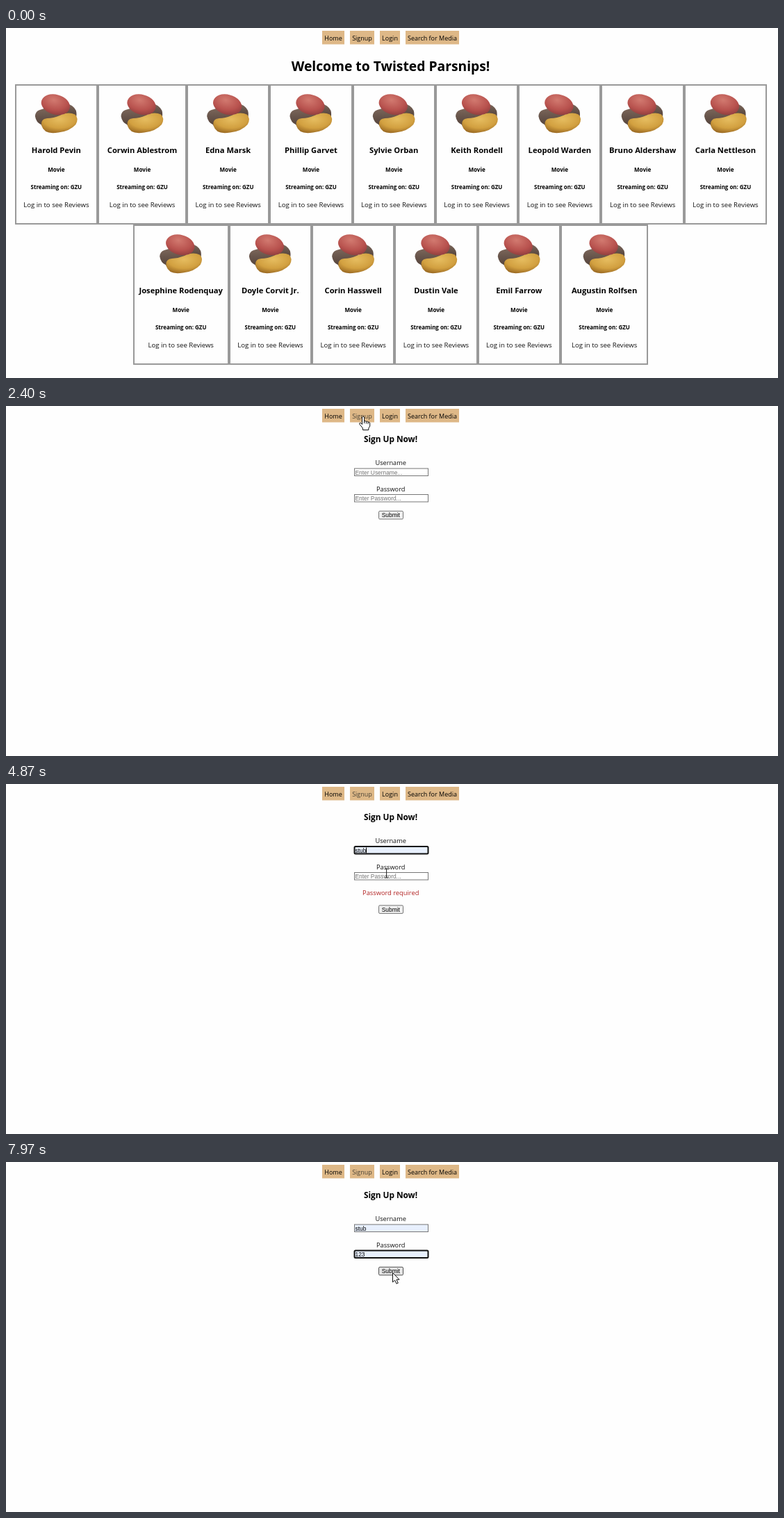
These frames come from a looping animation (1111x504 px, 8 s). An HTML page:

```html
<!DOCTYPE html>
<html lang="en">
<head>
<meta charset="utf-8">
<title>Signup walkthrough</title>
<style>
  html, body { margin: 0; width: 100%; height: 100%; overflow: hidden; background: #fefefe; }
  svg { display: block; width: 100%; height: 100%; }
  text { font-family: "Open Sans", "Noto Sans", sans-serif; fill: #000; }
  .b { font-weight: 700; }
  .mid { text-anchor: middle; }
  .nav { font-size: 9px; }
  .title { font-size: 19.3px; }
  .name { font-size: 11.2px; }
  .kind { font-size: 8.1px; }
  .stream { font-size: 7.95px; }
  .log { font-size: 9.6px; fill: #111; }
  .head { font-size: 11.8px; }
  .label { font-size: 9.2px; fill: #111; }
  .error { font-size: 9.3px; fill: #b22222; }
  .item { font-size: 10.3px; fill: #222; }
  .ui { font: 8.4px "Liberation Sans", Arial, sans-serif; }
  .hint { fill: #757575; }
</style>
</head>
<body>
<svg id="stage" viewBox="0 0 1111 504" xmlns="http://www.w3.org/2000/svg">
  <defs>
    <radialGradient id="red" cx=".4" cy=".3" r=".8">
      <stop offset="0" stop-color="#d27a70"/><stop offset=".6" stop-color="#b8524e"/><stop offset="1" stop-color="#87393a"/>
    </radialGradient>
    <radialGradient id="gold" cx=".5" cy=".3" r=".75">
      <stop offset="0" stop-color="#e6bd60"/><stop offset=".6" stop-color="#d2a040"/><stop offset="1" stop-color="#95641f"/>
    </radialGradient>
    <linearGradient id="brown" x2="0" y2="1">
      <stop offset="0" stop-color="#7c675b"/><stop offset="1" stop-color="#4c3c35"/>
    </linearGradient>
    <filter id="shadow" x="-10%" y="-10%" width="120%" height="120%">
      <feDropShadow dx="0" dy="1" stdDeviation="1.2" flood-opacity=".35"/>
    </filter>
    <g id="potatoes">
      <path d="M-30.5 127Q-30 120-24 118L-14 115 10 126-6 134-12 145Q-18 146-22 139Q-29 136-30.5 127Z" fill="url(#brown)"/>
      <path d="M14 109Q24 110 28.5 119Q30 125 28 130L8 128Z" fill="url(#brown)"/>
      <path d="M-21 141Q-23 131-13 130Q-4 130 5 126Q17 120 27 124.5Q33 130 28 139Q19 149 3 150.5Q-17 154-21 141Z" fill="url(#gold)"/>
      <ellipse cx="-1" cy="110.3" rx="21" ry="14.4" transform="rotate(15 -1 110.3)" fill="url(#red)"/>
    </g>
  </defs>
</svg>
<script>
const LOOP = 8000;
const stage = document.getElementById('stage');

function add(parent, tag, attrs = {}, content = '') {
  const node = document.createElementNS('http://www.w3.org/2000/svg', tag);
  for (const key in attrs) node.setAttribute(key, attrs[key]);
  node.textContent = content;
  parent.appendChild(node);
  return node;
}
const group = parent => add(parent, 'g');
const write = (parent, x, y, cls, content) => add(parent, 'text', { x, y, class: cls }, content);
const box = (parent, x, y, width, height, attrs) => add(parent, 'rect', { x, y, width, height, ...attrs });
const show = (node, on) => node.setAttribute('visibility', on ? 'inherit' : 'hidden');

// Navigation
const links = [['Home', 455, 32], ['Signup', 495, 35], ['Login', 538, 29], ['Search for Media', 575, 77]]
  .map(([label, x, width]) => {
    box(stage, x, 4, width, 19.5, { fill: '#deb887' });
    return write(stage, x + width / 2, 17.6, 'nav mid', label);
  });

// Home page
const home = group(stage);
write(home, 553.5, 62, 'title b mid', 'Welcome to Twisted Parsnips!');

function cardRow(left, top, names, wide) {
  let x = left;
  names.forEach((name, i) => {
    const width = wide[i] || 119.3;
    const edge = Math.round(x);
    box(home, edge + 1, top + 82, Math.round(x + width) - edge - 2, 200,
      { fill: 'none', stroke: '#999', 'stroke-width': 2 });
    const card = add(home, 'g', { transform: `translate(${x + width / 2} ${top})` });
    add(card, 'use', { href: '#potatoes' });
    write(card, 0, 180, 'name b mid', name);
    write(card, 0, 207, 'kind b mid', 'Movie');
    write(card, 0, 232, 'stream b mid', 'Streaming on: GZU');
    write(card, 0, 258.3, 'log mid', 'Log in to see Reviews');
    x += width;
  });
}
cardRow(12.7, 0, ['Harold Pevin', 'Corwin Ablestrom', 'Edna Marsk', 'Phillip Garvet', 'Sylvie Orban',
  'Keith Rondell', 'Leopold Warden', 'Bruno Aldershaw', 'Carla Nettleson'], { 1: 128 });
cardRow(182.7, 202, ['Josephine Rodenquay', 'Doyle Corvit Jr.', 'Corin Hasswell', 'Dustin Vale',
  'Emil Farrow', 'Augustin Rolfsen'], { 0: 138, 5: 126.4 });

// Signup form
const form = group(stage);
write(form, 553.5, 51.5, 'head b mid', 'Sign Up Now!');

function makeField(y, label, hint, value, caretX) {
  write(form, 553.7, y - 4.5, 'label mid', label);
  const frame = box(form, 501.5, y + .5, 106, 10.5, {});
  const hintText = write(form, 502.5, y + 9.2, 'ui hint', hint);
  const valueText = write(form, 502.5, y + 9.2, 'ui', value);
  const caret = box(form, caretX, y + 2, 1, 8, {});
  return (filled, focused, caretOn) => {
    frame.setAttribute('fill', filled ? '#e8f0fe' : '#fff');
    frame.setAttribute('stroke', focused ? '#101010' : '#767676');
    frame.setAttribute('stroke-width', focused ? 2 : 1);
    frame.setAttribute('rx', focused ? 1.5 : 0);
    show(hintText, !filled);
    show(valueText, filled);
    show(caret, caretOn);
  };
}
const setUser = makeField(89.5, 'Username', 'Enter Username...', 'stub', 518);
const setPass = makeField(127, 'Password', 'Enter Password...', '123', 516.5);
const error = write(form, 553.7, 160, 'error mid', 'Password required');
const submit = group(form);
const submitFace = box(submit, 536.5, 151.3, 35, 11.6, { rx: 1.5 });
write(submit, 553.8, 160, 'ui mid', 'Submit');

function makeMenu(top, items) {
  const node = group(form);
  box(node, 536, top, 131.3, items.length * 30.3 + 6.6, { rx: 6, fill: '#fff', filter: 'url(#shadow)' });
  const hover = group(node);
  const mid = top + 18.2;
  box(hover, 539.5, mid - 15, 124.5, 30, { fill: '#f1f1f1' });
  add(hover, 'path', { d: `M645.3 ${mid - 3.6}l7.2 7.2m0-7.2l-7.2 7.2`, stroke: '#3c4043', 'stroke-width': 1.5 });
  items.forEach((item, i) => write(node, 546.3, mid + 3.8 + i * 30.3, 'item', item));
  return { node, hover };
}
const userMenu = makeMenu(109.7, ['stub', 'Ferdinandus', 'Oscar', 'STUB', 'Hugh', 'Edgar']);
const passMenu = makeMenu(147.9, ['123', 'abc', 'ilovefarts']);

// Pointer
const pointer = group(stage);
const halo = add(pointer, 'circle', { r: 9.8, fill: '#f0e000', opacity: .7 });
const ink = { fill: '#fff', stroke: '#111', 'stroke-width': 1, 'stroke-linejoin': 'round' };
const shapes = {
  arrow: add(pointer, 'path', { ...ink, d: 'M.5 .5V14L3.7 11.2 6 16.3 8.3 15.2 6 10.3H10Z' }),
  hand: add(pointer, 'path', { ...ink,
    d: 'M-1.5 1Q0-1 1.5 1V7Q3 5.8 4.3 7.5Q5.8 6.4 7 8.2Q9.5 7.5 9.7 10V14L7.8 17V19.5H-.5V17L-5.3 11Q-5.5 9-3.5 9.3L-1.5 11.5ZM1.5 7V10M4.3 7.5V10.5M7 8.2V11' }),
  beam: add(pointer, 'path', { d: 'M-2.5-6.5H-.8L0-6 .8-6.5H2.5M0-6V6M-2.5 6.5H-.8L0 6 .8 6.5H2.5',
    fill: 'none', stroke: '#222' })
};

// Each move: start, end, number of steps, evenly timed waypoints
const moves = [
  [500, 1260, 12, [[1014, 470], [905, 360], [690, 155], [565, 60], [537, 39]]],
  [1330, 1400, 2, [[537, 39], [526, 28], [516, 16]]],
  [1550, 1550, 1, [[516, 16], [514, 15]]],
  [2800, 3520, 12, [[514, 15], [515, 45], [516, 76], [523, 96], [523, 96]]],
  [3850, 4600, 11, [[523, 96], [529.5, 107], [546, 121], [553, 124]]],
  [4670, 4940, 5, [[553, 124], [553, 124], [548, 127], [547, 131], [546, 133]]],
  [6210, 6970, 12, [[546, 133], [549, 142], [554, 155], [556, 161], [556, 161]]],
  [7900, 7970, 2, [[556, 161], [556, 160], [556, 159]]]
];
const clicks = [[2350, 2400], [3400, 3465], [4670, 4740], [5330, 5400], [7100, 7170]];
const between = (t, from, to) => t >= from && t < to;

function pointerAt(t) {
  const [start, end, steps, points] = moves.filter(m => t >= m[0]).pop() || moves[0];
  const index = t >= end ? steps - 1 : Math.max(0, Math.floor((t - start) / (end - start) * (steps - 1)));
  const place = (index + 1) / steps * (points.length - 1);
  const i = Math.min(points.length - 2, Math.floor(place));
  return [0, 1].map(k => points[i][k] + (points[i + 1][k] - points[i][k]) * (place - i));
}

function renderForm(t, x, y) {
  const userOpen = between(t, 3465, 4740);
  const passOpen = between(t, 5460, 7170);
  const overUser = userOpen && x > 540 && y > 113;
  const overPass = passOpen && x > 540 && y > 151;
  show(userMenu.node, userOpen);
  show(passMenu.node, passOpen);
  show(userMenu.hover, overUser);
  show(passMenu.hover, overPass);

  setUser(overUser || t >= 4670, between(t, 3400, 5330), between(t, 4740, 5330));
  setPass(overPass || t >= 7100, t >= 5330, between(t, 7240, 7700));

  const failed = between(t, 4800, 7240);
  show(error, failed);
  submit.setAttribute('transform', `translate(0 ${failed ? 23.5 : 0})`);
  submitFace.setAttribute('fill', t >= 7900 ? '#e5e5e5' : '#efefef');
  submitFace.setAttribute('stroke', t >= 7900 ? '#4f4f4f' : '#767676');
}

function render(t) {
  const [x, y] = pointerAt(t);
  const onForm = t >= 2400;
  home.style.display = onForm ? 'none' : '';
  form.style.display = onForm ? '' : 'none';
  links[1].style.fill = onForm ? '#4a4336' : '#000';
  renderForm(t, x, y);

  const overField = onForm && between(x, 501, 608) && (between(y, 89, 102) || between(y, 126, 139));
  const kind = y < 24 ? 'hand' : overField ? 'beam' : 'arrow';
  pointer.setAttribute('transform', `translate(${x} ${y})`);
  show(pointer, t >= 500);
  for (const key in shapes) show(shapes[key], key === kind);
  show(halo, clicks.some(([from, to]) => between(t, from, to)));
}

const began = performance.now();
function tick() {
  render((performance.now() - began) % LOOP);
  requestAnimationFrame(tick);
}
tick();
</script>
</body>
</html>
```
